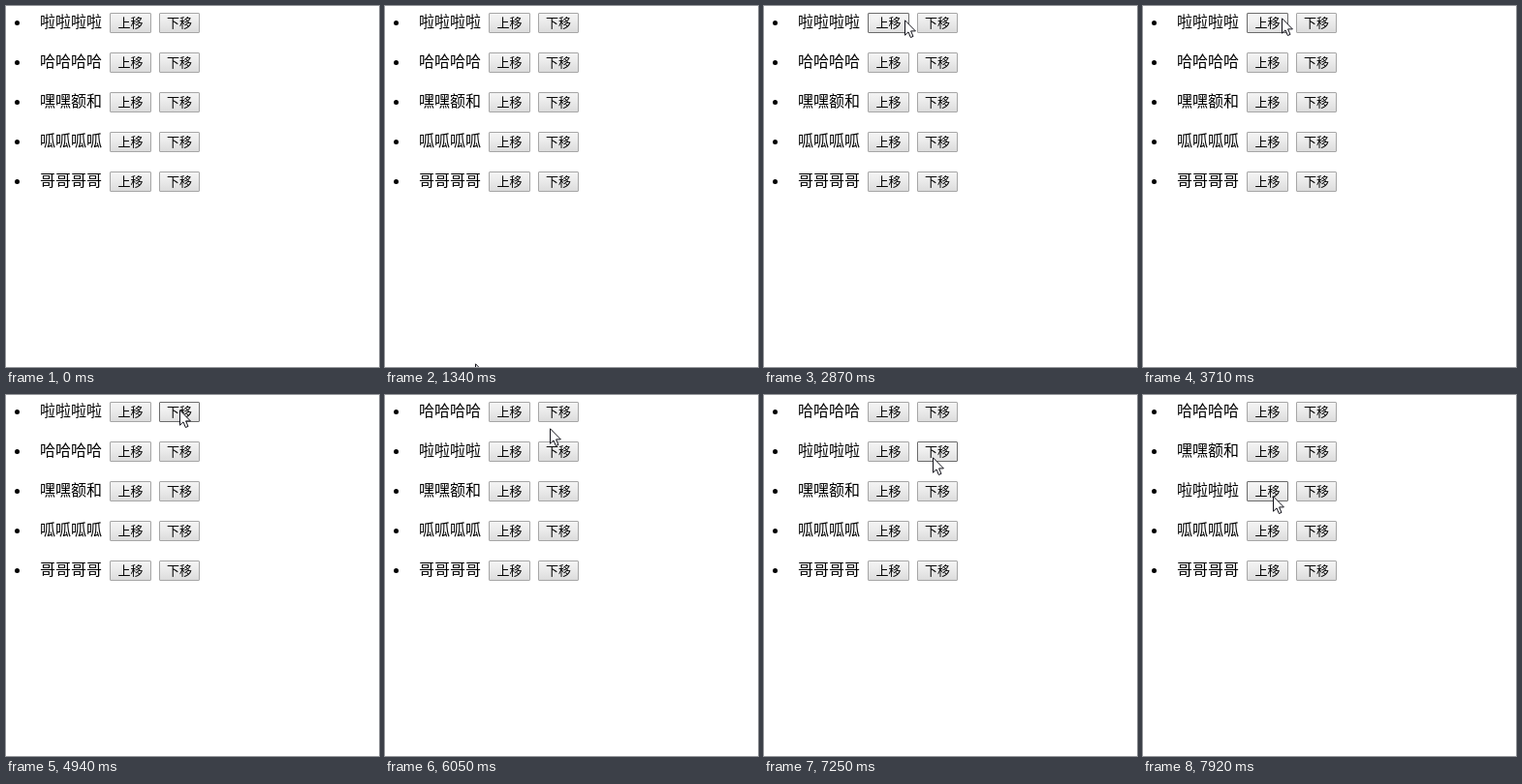
These frames come from a looping animation (385 by 373 pixels, 8000 ms). An HTML page:

```html
<!DOCTYPE html>
<html lang="zh">
<head>
<meta charset="utf-8">
<style>
  html, body { margin: 0; width: 100%; height: 100%; overflow: hidden; background: #fff; }
  #stage { position: relative; width: 385px; height: 373px; overflow: hidden;
    color: #000; font-family: "Noto Sans CJK SC", "Noto Sans CJK", sans-serif; }
  .row { position: absolute; left: 0; width: 385px; height: 21px; }
  .row::before { content: ""; position: absolute; left: 9px; top: 8px;
    width: 5px; height: 5px; border-radius: 50%; background: #000; }
  .label { position: absolute; left: 35px; top: -3px; font-size: 16px; line-height: 22px; white-space: nowrap; }
  .btn { position: absolute; top: 0; box-sizing: border-box; height: 21px;
    border: 1px solid #a6a6a6; border-radius: 1px;
    background: linear-gradient(#f4f4f4, #ececec 40%, #dcdcdc);
    font-size: 13px; line-height: 17px; text-align: center; white-space: nowrap; }
  .up { left: 107px; width: 43px; }
  .down { left: 158px; width: 42px; }
  .hover { border-color: #6c6c6c; background: linear-gradient(#f6f6f6, #f0f0f0 40%, #e0e0e0); }
  #cursor { position: absolute; left: 0; top: 0; width: 13px; height: 20px; overflow: visible; }
</style>
</head>
<body>
<div id="stage">
  <svg id="cursor" viewBox="0 0 13 20">
    <path d="M.5 .8V16.2L4 12.9L6.4 18.5L9 17.4L6.6 11.9H11.4Z" fill="#fff" stroke="#101018" stroke-width="1"/>
  </svg>
</div>
<script>
const LOOP = 8000, BEAT = 140, ROW_GAP = 41;
const words = ['啦啦啦啦', '哈哈哈哈', '嘿嘿额和', '呱呱呱呱', '哥哥哥哥'];
const swaps = [{ at: 5620, row: 0 }, { at: 7370, row: 1 }];

// Pointer strokes: start, end, x, y, sideways bow
const entry = { x: 93, y: 369 };
const strokes = [
  [1340, 1730, 124, 323],
  [1730, 2450, 75, 32, -30],
  [2450, 2600, 84, 13],
  [2600, 3290, 180, 14],
  [3430, 3710, 143, 12, 9],
  [3710, 3870, 130, 15],
  [3870, 4290, 176, 15],
  [4800, 4940, 179, 15],
  [5910, 6050, 170, 34],
  [6050, 6320, 108, 72, 28],
  [6320, 6590, 78, 70],
  [6590, 7250, 174, 64],
  [7490, 7770, 163, 106],
  [7770, 7920, 134, 104]
];

const stage = document.getElementById('stage');
const cursor = document.getElementById('cursor');

function add(parent, cls, text = '') {
  const el = document.createElement('div');
  el.className = cls;
  el.textContent = text;
  parent.insertBefore(el, parent === stage ? cursor : null);
  return el;
}

const rows = words.map((word, i) => {
  const row = add(stage, 'row'), top = 7 + i * ROW_GAP;
  row.style.top = top + 'px';
  return {
    top,
    label: add(row, 'label', word),
    up: add(row, 'btn up', '上移'),
    down: add(row, 'btn down', '下移')
  };
});

// Each stroke slows towards its end and is shown in hops of about one beat.
function pointer(t) {
  let { x, y } = entry;
  for (const [start, end, toX, toY, bow = 0] of strokes) {
    if (t < start) break;
    const span = end - start, hops = Math.round(span / BEAT);
    const u = Math.min(1, Math.floor((t - start) / span * hops + 0.1) / hops);
    const p = 1 - (1 - u) ** 2;
    x += (toX - x) * p + bow * Math.sin(Math.PI * u);
    y += (toY - y) * p;
    if (u < 1) break;
  }
  return { x: Math.round(x), y: Math.round(y) };
}

function draw(t) {
  const order = words.slice();
  for (const { at, row } of swaps)
    if (t >= at) [order[row], order[row + 1]] = [order[row + 1], order[row]];

  const { x, y } = pointer(t);
  cursor.style.visibility = t < strokes[0][0] ? 'hidden' : 'visible';
  cursor.style.transform = `translate(${x}px, ${y}px)`;

  rows.forEach((row, i) => {
    if (row.label.textContent !== order[i]) row.label.textContent = order[i];
    const inRow = y >= row.top && y < row.top + 21;
    row.up.classList.toggle('hover', inRow && x >= 107 && x < 150);
    row.down.classList.toggle('hover', inRow && x >= 158 && x < 200);
  });
}

const start = performance.now();
function tick() {
  draw((performance.now() - start) % LOOP);
  requestAnimationFrame(tick);
}
tick();
</script>
</body>
</html>
```
